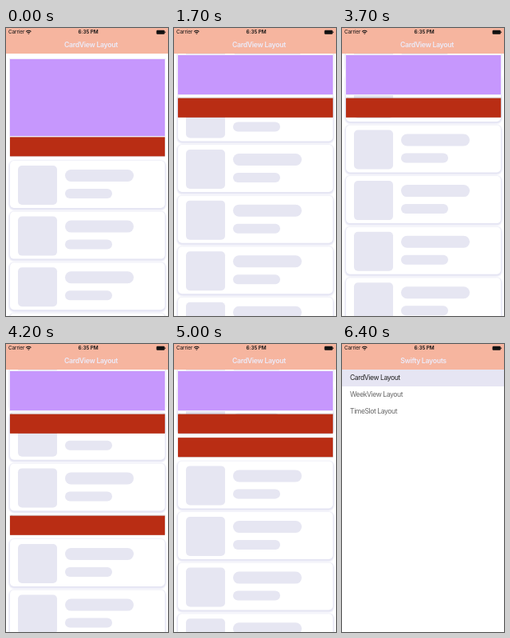
These frames come from a looping animation (203 by 360 pixels, 6.5 s). An HTML page:

```html
<!DOCTYPE html>
<html lang="en">
<head>
<meta charset="utf-8">
<title>Layouts</title>
<style>
  html, body { margin: 0; width: 100%; height: 100%; overflow: hidden; background: #fff; }
  body { position: relative; font-family: Inter, Roboto, sans-serif; }
  div, svg { position: absolute; box-sizing: border-box; }
  #stage { width: 203px; height: 360px; overflow: hidden; }
  .page { left: 0; top: 0; width: 203px; height: 360px; background: #fff; overflow: hidden; }
  #detail { box-shadow: 0 0 6px rgba(0, 0, 0, .15); }

  .card { left: 5px; top: 0; width: 194px; height: 59px; border-radius: 5px; background: #fff;
          box-shadow: 0 1px 2px 1.5px #e4e4f3; }
  .card div { background: #e6e6f2; }
  .thumb { left: 10px; top: 6px; width: 49px; height: 49px; border-radius: 5px; }
  .line1 { left: 69px; top: 11px; width: 86px; height: 15px; border-radius: 8px; }
  .line2 { left: 69px; top: 35px; width: 59px; height: 12px; border-radius: 6px; }
  .head { left: 5px; top: 0; width: 194px; height: 24px; background: #b92d14;
          box-shadow: 0 0 1.5px .5px rgba(100, 60, 60, .6); }
  #hero { left: 5px; width: 194px; background: #c697fd; box-shadow: 0 0 1px 1px #f1edf8; }

  .row { left: 0; width: 203px; height: 21.2px; padding-left: 10px; line-height: 21.2px;
         font-size: 8.6px; letter-spacing: -.42px; color: #666; white-space: nowrap; }
  .row.on { background: #e6e5f3; color: #222; }

  #nav { left: 0; top: 0; width: 203px; height: 32px; background: #f6b59f; }
  .title { top: 14.6px; width: 120px; line-height: 12px; text-align: center; white-space: nowrap;
           font-size: 8.7px; font-weight: 600; letter-spacing: -.3px; color: #ebebfa; }
  .status { top: 1px; line-height: 9px; font-size: 6.4px; letter-spacing: -.1px; white-space: nowrap; color: #111; }
</style>
</head>
<body>
<div id="stage">
  <div class="page" id="menu">
    <div class="row" id="pick" style="top:32px">CardView Layout</div>
    <div class="row" style="top:53.2px">WeekView Layout</div>
    <div class="row" style="top:74.4px">TimeSlot Layout</div>
  </div>
  <div class="page" id="detail"></div>
  <div id="nav">
    <div class="title" id="menuTitle" style="left:42px">Swifty Layouts</div>
    <div class="title" id="detailTitle" style="left:46.5px">CardView Layout</div>
    <div class="status" style="left:3px">Carrier</div>
    <div class="status" style="left:73px;width:60px;text-align:center;font-weight:600">6:35 PM</div>
    <svg width="203" height="12" style="left:0;top:0" fill="none" stroke="#111">
      <path d="M25.2 4.5q3.1-2.6 6.2 0M26.5 6q1.8-1.4 3.6 0" stroke-width="1.1"/>
      <circle cx="28.3" cy="7.1" r=".7" fill="#111" stroke="none"/>
      <rect x="188.5" y="2.8" width="10.3" height="5" rx="1.2" fill="#111" stroke="none"/>
      <path d="M199.6 4.5v1.6" stroke-width=".8"/>
    </svg>
  </div>
</div>
<script>
const LOOP = 6500, PITCH = 63.6, FIRST = 166, PER_SECTION = 9;
const SECOND_HEAD = FIRST + PITCH * PER_SECTION + 2;
const $ = id => document.getElementById(id);
const clamp = (x, lo, hi) => Math.min(hi, Math.max(lo, x));

function add(className, html = '') {
  const el = document.createElement('div');
  el.className = className;
  el.innerHTML = html;
  $('detail').append(el);
  return el;
}
const place = (el, y) => { el.style.transform = `translateY(${y}px)`; };

const cards = Array.from({ length: PER_SECTION * 2 }, (_, i) => ({
  el: add('card', '<div class="thumb"></div><div class="line1"></div><div class="line2"></div>'),
  y: i < PER_SECTION ? FIRST + PITCH * i : SECOND_HEAD + 29 + PITCH * (i - PER_SECTION)
}));
const head1 = add('head'), head2 = add('head'), hero = add('');
hero.id = 'hero';

// Finger drag up to full speed, then exponential deceleration.
function flick(x, drag, speed, tau) {
  if (x <= 0) return 0;
  if (x < drag) return speed * x * x / drag / 2;
  return speed * (drag / 2 + tau * (1 - Math.exp((drag - x) / tau)));
}
const scrollAt = t =>
  flick(Math.min(t, 1700), 350, .3452, 460) + flick(Math.min(t, 5500) - 3463, 237, .7375, 470);

function draw(t) {
  const s = scrollAt(t);
  for (const c of cards) place(c.el, c.y - s);

  const second = Math.max(88, SECOND_HEAD - s);
  place(head2, second - .2);
  place(head1, Math.min(Math.max(88, 136.5 - s), second - 29) - .2);

  const shrink = clamp(s / 48.5, 0, 1);
  hero.style.top = 39 - 5 * shrink + 'px';
  hero.style.height = 96 - 47 * shrink + 'px';

  const pop = 1 - (1 - clamp((t - 5500) / 400, 0, 1)) ** 3;
  $('detail').style.transform = `translateX(${pop * 210}px)`;
  $('menu').style.transform = `translateX(${(pop - 1) * 61}px)`;
  $('detailTitle').style.transform = `translateX(${pop * 60}px)`;
  $('menuTitle').style.transform = `translateX(${(pop - 1) * 60}px)`;
  $('detailTitle').style.opacity = 1 - pop;
  $('menuTitle').style.opacity = pop;
  $('pick').classList.toggle('on', t >= 6200);
}

const start = performance.now();
function tick() {
  draw((performance.now() - start) % LOOP);
  requestAnimationFrame(tick);
}
tick();
</script>
</body>
</html>
```
